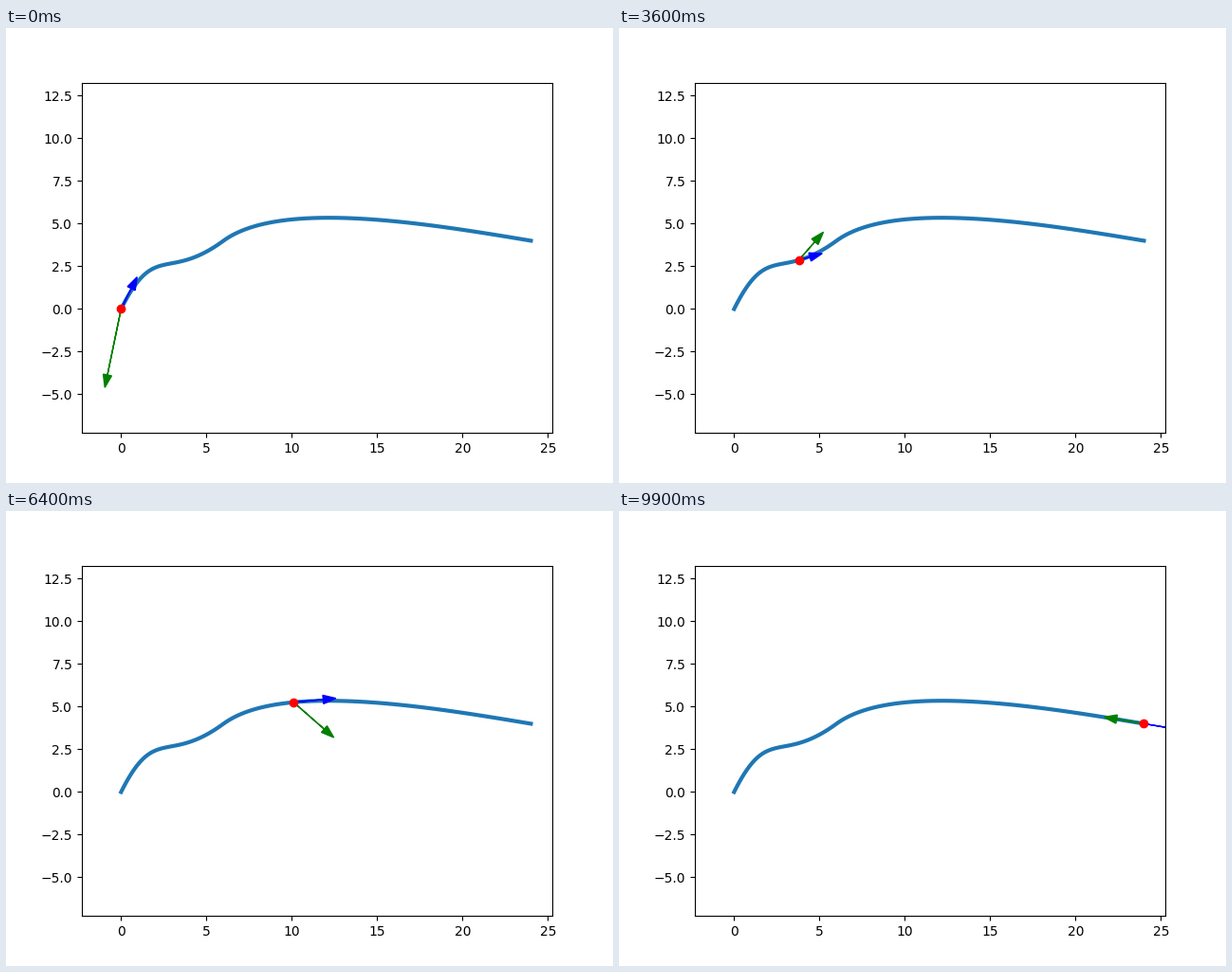
These frames come from a looping animation (640 px wide and 480 px high, 10 s). A matplotlib script:

```python
import numpy as np
import matplotlib.pyplot as plt
from matplotlib.animation import FuncAnimation
from matplotlib.patches import FancyArrow

FRAMES = 100
ARROW_SCALE = 0.1

# Cubic Hermite spline: knots and the tangents there
knots = np.array([(0, 0), (6, 4), (24, 4)], float)
tangents = np.array([(6, 12), (10, 22 / 3), (18, -3)], float)


def motion(t):
    """Position, velocity and acceleration at time t in [0, 2]."""
    i = min(int(t), 1)
    u = t - i
    p, m0, m1 = knots[i], tangents[i], tangents[i + 1]
    d = knots[i + 1] - p
    a = 6 * d - 4 * m0 - 2 * m1
    j = 6 * (m0 + m1) - 12 * d
    pos = p + m0 * u + a * u**2 / 2 + j * u**3 / 6
    vel = m0 + a * u + j * u**2 / 2
    return pos, vel, a + j * u


states = [motion(t) for t in np.linspace(0, 2, FRAMES)]
path = np.array([s[0] for s in states])

fig, ax = plt.subplots(figsize=(6.4, 4.8), dpi=100)
ax.set_xlim(-2.297, 25.252)
half = 27.549 * 369.6 / 496 / 2
ax.set_ylim(3 - half, 3 + half)
ax.plot(path[:, 0], path[:, 1], lw=3)


def add_arrow(color):
    arrow = FancyArrow(0, 0, 1, 1, width=0.001, head_width=0.5,
                       head_length=0.75, color=color, zorder=3)
    return ax.add_patch(arrow)


vel_arrow = add_arrow("blue")
acc_arrow = add_arrow("green")
dot, = ax.plot([0], [0], "ro", zorder=4)


def update(frame):
    pos, vel, acc = states[frame]
    for arrow, vec in ((vel_arrow, vel), (acc_arrow, acc)):
        dx, dy = ARROW_SCALE * vec
        arrow.set_data(x=pos[0], y=pos[1], dx=dx, dy=dy)
    dot.set_data([pos[0]], [pos[1]])
    return vel_arrow, acc_arrow, dot


anim = FuncAnimation(fig, update, frames=FRAMES, interval=100,
                     repeat=True, repeat_delay=0)
plt.show()
```
